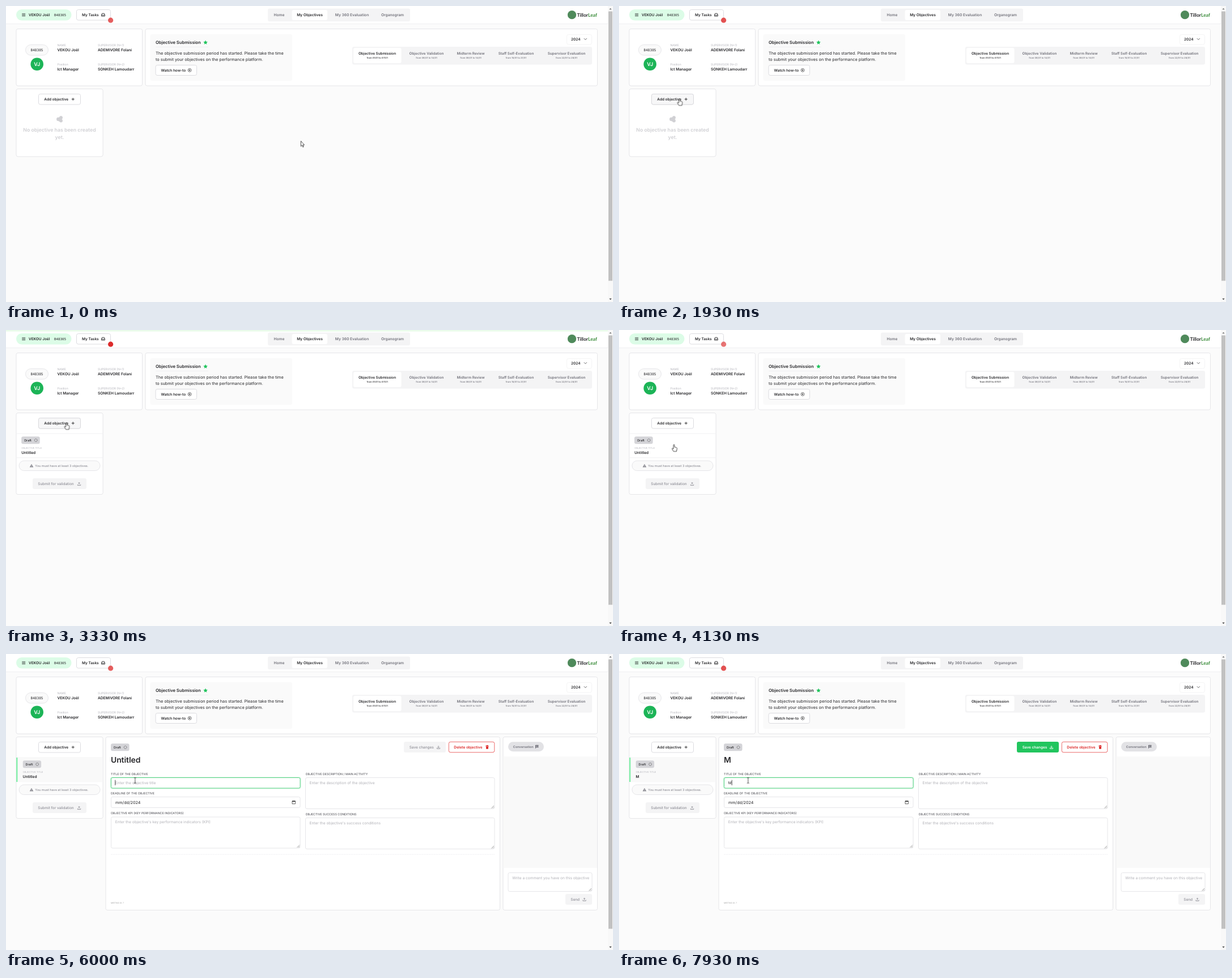
An HTML page that plays this animation: 1071 by 523 pixels, repeating every 8000 ms.

```html
<!DOCTYPE html>
<html lang="en">
<head>
<meta charset="utf-8">
<title>My objectives</title>
<style>
html, body { margin: 0; width: 100%; height: 100%; overflow: hidden; background: #fbfbfb; }
svg { display: block; width: 100vw; height: 100vh; }
text { font: 600 6.45px Inter, sans-serif; fill: #27272a; white-space: pre; text-rendering: geometricPrecision; }
.mid text, .mid { text-anchor: middle; }
.nav text { font-size: 6.6px; }
.name { font-size: 6.6px; }
.stage { font-size: 6.3px; }
.dates { font-size: 4.1px; font-weight: 500; }
.mono { font: 5.8px "DejaVu Sans Mono", monospace; }
.label { font-size: 5.1px; font-weight: 400; fill: #b4b4bb; }
.caps { font-size: 5.25px; font-weight: 400; fill: #3f3f46; }
.hint { font-size: 6.6px; font-weight: 400; fill: #b0b0b6; }
.body { font-size: 7.29px; font-weight: 400; }
.title { font-size: 13.8px; }
.grey { fill: #71717a; }
.off { fill: #8e8e96; font-weight: 500; }
.card, .btn, .box { fill: #fff; stroke: #e0e0e4; stroke-width: .8; }
.btn { stroke: #d4d4d8; }
.soft { fill: #f4f4f5; }
.rule { stroke: #ededef; stroke-width: .8; fill: none; }
.ico { fill: none; stroke: #27272a; stroke-width: .9; }
.ico.dim { stroke: #8e8e96; }

/* one 8 s timeline for everything */
.a { animation: 8s step-end infinite; }
.pulse { fill: #dc2626; animation: pulse 2s cubic-bezier(.4,0,.6,1) -.51s infinite; }
.hover { animation-name: hover; }
.empty { animation-name: empty; }
.list { animation-name: list; }
.open { animation-name: open; }
.row { animation-name: shift; }
.focus { animation-name: focus; }
.caret { animation-name: caret; }
.before { animation-name: before; }
.typed { animation-name: typed; }
.arrow { animation-name: arrow; }
.hand { animation-name: hand; }
.beam { animation-name: beam; }
.bar { fill: #90ee90; animation: bar 8s linear infinite; }
.cursor { animation: move 8s ease-in-out infinite; }

@keyframes pulse { 50% { opacity: .5; } }
@keyframes hover { 0%, 48.625%, 100% { opacity: 0; } 22.375% { opacity: 1; } }
@keyframes empty { 0% { opacity: 1; } 30%, 100% { opacity: 0; } }
@keyframes list { 0% { opacity: 0; } 30%, 100% { opacity: 1; } }
@keyframes open { 0% { opacity: 0; } 56.625%, 100% { opacity: 1; } }
@keyframes shift { 0% { transform: none; } 56.625%, 100% { transform: translateX(2.4px); } }
@keyframes focus { 0% { opacity: 0; } 73.625%, 100% { opacity: 1; } }
@keyframes caret { 0%, 79.875%, 92.375%, 100% { opacity: 0; } 73.625%, 86.125% { opacity: 1; } }
@keyframes before { 0% { opacity: 1; } 96.625%, 100% { opacity: 0; } }
@keyframes typed { 0% { opacity: 0; } 96.625%, 100% { opacity: 1; } }
@keyframes arrow { 0%, 48.625%, 70.125% { opacity: 1; } 22.375%, 49.5%, 70.625%, 100% { opacity: 0; } }
@keyframes hand { 0%, 48.625%, 70.125%, 100% { opacity: 0; } 22.375%, 49.5% { opacity: 1; } }
@keyframes beam { 0% { opacity: 0; } 70.625%, 100% { opacity: 1; } }
@keyframes bar {
  0%, 26.6% { width: 0; opacity: 1; }
  29.1% { width: 85px; }
  32.5% { width: 182px; }
  34.1% { width: 211px; }
  36.5% { width: 290px; }
  39.4% { width: 1062px; opacity: 1; }
  41.6% { width: 1062px; opacity: .2; }
  43.5%, 100% { width: 1062px; opacity: 0; }
}
@keyframes move {
  0%, .9% { transform: translate(520px, 238.5px); animation-timing-function: ease-in; }
  10.875% { transform: translate(255.5px, 191px); animation-timing-function: ease-out; }
  20.5%, 21.6% { transform: translate(95px, 177px); }
  23%, 46.25% { transform: translate(106.5px, 163.5px); }
  53.1%, 66.9% { transform: translate(96px, 206.3px); }
  72.9%, 100% { transform: translate(227.7px, 223.2px); }
}
</style>
</head>
<body>
<svg viewBox="0 0 1071 523" preserveAspectRatio="none">
<defs>
  <g id="draft">
    <rect width="32.5" height="13" rx="3" fill="#d4d4d8"/>
    <text x="5" y="8.5" style="font-size:5.4px;font-weight:500">Draft</text>
    <circle cx="25.5" cy="6.6" r="2.4" class="ico" style="stroke-width:.7;stroke-dasharray:1.2 .7"/>
  </g>
  <path id="grip" d="M-1-5.500L-5.500-1M-1-3L-3-1" fill="none" stroke="#777" stroke-width=".7"/>
  <path id="upload" d="M-2.600 .8V2.500H2.600V.8M0 1V-2.600M-1.500-1.200L0-2.700 1.500-1.200"/>
  <path id="save" d="M-2.600 .8V2.500H2.600V.8M0-2.700V1M-1.500-.4L0 1.100 1.500-.4"/>
</defs>

<rect width="1071" height="523" fill="#fbfbfb"/>

<!-- header -->
<rect width="1062" height="31" fill="#fff"/>
<path class="rule" d="M0 31.500H1062"/>
<rect x="18" y="6" width="97.500" height="19.500" rx="9.750" fill="#dcfce7"/>
<path class="ico" d="M28.200 13.700h6M28.200 15.700h6M28.200 17.700h6" style="stroke-width:.8"/>
<text x="40" y="18">VEKOU Joël</text>
<text x="85" y="17.800" class="mono">B48305</text>
<rect class="btn" x="124.500" y="6.500" width="60" height="18.500" rx="3"/>
<text x="134" y="18">My Tasks</text>
<path class="ico" d="M168.500 15.800L169.500 13.200H173.300L174.300 15.800V18H168.500ZM168.500 15.800H170.200L170.800 16.700H172L172.600 15.800H174.300"/>
<circle class="pulse" cx="184.600" cy="25.200" r="4.600"/>
<rect class="soft" x="462" y="4.500" width="251" height="22.800" rx="3"/>
<rect x="504.500" y="7" width="62.500" height="18" rx="3" fill="#fff"/>
<g class="nav mid">
  <text x="482" y="18" class="grey">Home</text>
  <text x="536" y="18">My Objectives</text>
  <text x="610.500" y="18" class="grey">My 360 Evaluation</text>
  <text x="682" y="18" class="grey">Organogram</text>
</g>
<circle cx="998.500" cy="15.700" r="7.600" fill="#4f8a5b"/>
<text x="1007.500" y="19" style="font:700 8.500px Lato,sans-serif">Tillor<tspan fill="#3f8f3f">Leaf</tspan></text>

<!-- profile -->
<rect class="card" x="18" y="40.500" width="222.500" height="100.500" rx="3"/>
<rect x="34.500" y="68.500" width="40" height="18.500" rx="9.250" fill="#fafafa" stroke="#e0e0e4" stroke-width=".8"/>
<text x="54.500" y="80" class="mono mid" style="font-size:6.100px">B48305</text>
<circle cx="54.700" cy="102.700" r="11.300" fill="#1cb457"/>
<text x="54.700" y="106" class="mid" style="font-size:9px;fill:#fff">VJ</text>
<text x="90.500" y="71.300" class="label">NAME</text>
<text x="90.500" y="80.300" class="name">VEKOU Joël</text>
<text x="162" y="71.300" class="label">SUPERVISOR (N+1)</text>
<text x="162" y="80.300" class="name">ADEMIVORE Folani</text>
<text x="90.500" y="105" class="label">Position</text>
<text x="90.500" y="114" class="name">Ict Manager</text>
<text x="162" y="105" class="label">SUPERVISOR (N+2)</text>
<text x="162" y="114" class="name">SONKEH Lamoudarr</text>

<!-- period -->
<rect class="card" x="246" y="40.500" width="797.500" height="100.500" rx="3"/>
<rect x="254.500" y="50" width="250.500" height="82" rx="3" fill="#fafafa"/>
<text x="264" y="67" style="font-size:7.600px">Objective Submission</text>
<path d="M352 60.600l1.150 2.400 2.600.35-1.900 1.800.5 2.600-2.350-1.250-2.350 1.250.5-2.600-1.900-1.800 2.600-.35z" fill="#22c55e"/>
<path class="rule" d="M264 72.500H357"/>
<text x="264" y="85.600" class="body">The objective submission period has started. Please take the time</text>
<text x="264" y="96.600" class="body">to submit your objectives on the performance platform.</text>
<rect class="btn" x="264" y="104.500" width="72.500" height="18" rx="3"/>
<text x="273.500" y="115.600">Watch how-to</text>
<circle class="ico" cx="324" cy="113.400" r="2.900" style="stroke-width:.7"/>
<path d="M323.100 112l2.300 1.400-2.300 1.400z"/>
<rect x="989.500" y="50.500" width="44" height="17.500" rx="3" fill="#fff" stroke="#f4f4f5"/>
<text x="997" y="61">2024</text>
<path class="ico" d="M1019.800 57.200l2.500 2.500 2.500-2.500" style="stroke-width:.7"/>
<rect class="soft" x="611" y="72" width="423" height="31.500" rx="3"/>
<rect x="613" y="74" width="84.500" height="27" rx="3" fill="#fff"/>
<g class="mid">
  <text x="655" y="85.500" class="stage">Objective Submission</text>
  <text x="655" y="93.200" class="dates">from 01/01 to 07/01</text>
  <text x="742" y="85.500" class="stage grey">Objective Validation</text>
  <text x="742" y="93.200" class="dates grey">from 08/01 to 14/01</text>
  <text x="820" y="85.500" class="stage grey">Midterm Review</text>
  <text x="820" y="93.200" class="dates grey">from 08/01 to 14/01</text>
  <text x="900" y="85.500" class="stage grey">Staff Self-Evaluation</text>
  <text x="900" y="93.200" class="dates grey">from 15/01 to 21/01</text>
  <text x="989" y="85.500" class="stage grey">Supervisor Evaluation</text>
  <text x="989" y="93.200" class="dates grey">from 22/01 to 28/01</text>
</g>

<!-- no objectives -->
<g class="a empty mid">
  <rect class="card" x="18" y="146.500" width="153" height="119.500" rx="3"/>
  <g fill="#d0d0d4"><circle cx="92.300" cy="200" r="3.200"/><circle cx="97" cy="197.200" r="2.900"/><circle cx="97" cy="202.700" r="2.900"/><path d="M92 197.500l5-2.500v10l-5-2z"/></g>
  <text x="94.500" y="221.700" style="font-size:8.750px;fill:#d0d0d4">No objective has been created</text>
  <text x="94.500" y="234.700" style="font-size:8.750px;fill:#d0d0d4">yet.</text>
</g>

<!-- objective list -->
<g class="a list">
  <rect class="card" x="18" y="146.500" width="153" height="144" rx="3"/>
  <path class="rule" d="M18.500 183H170.500M18.500 225.700H170.500"/>
  <g class="a open">
    <rect x="18.500" y="183" width="152" height="43" fill="#f9f9f9"/>
    <rect x="18" y="183" width="2.500" height="43" fill="#86efac"/>
  </g>
  <g class="a row">
    <use href="#draft" x="27.200" y="188.200"/>
    <text x="27.200" y="210" class="label" style="font-size:4.200px">OBJECTIVE TITLE</text>
    <text x="27.200" y="219" class="name a before">Untitled</text>
    <text x="27.200" y="219" class="name a typed">M</text>
  </g>
  <rect x="23" y="231" width="143" height="17.500" rx="8.750" fill="#fafafa" stroke="#e0e0e4" stroke-width=".8"/>
  <path d="M45 236.800l3.300 5.800h-6.600z" fill="#85858d"/>
  <path d="M45 238.700v2M45 241.300v.7" stroke="#fff" stroke-width=".7"/>
  <text x="51.300" y="241.800" class="off" style="font-size:5.500px">You must have at least 3 objectives.</text>
  <rect class="soft" x="47" y="262" width="95" height="19" rx="3"/>
  <text x="56.300" y="274" class="off">Submit for validation</text>
  <use href="#upload" x="129" y="272" class="ico dim"/>
</g>
<rect class="btn" x="57.500" y="155.500" width="74" height="18.500" rx="3"/>
<rect class="btn a hover" x="57.500" y="155.500" width="74" height="18.500" rx="3" style="fill:#f7f7f8"/>
<text x="67.300" y="167">Add objective</text>
<path class="ico" d="M115.700 164.700h5M118.200 162.200v5"/>

<!-- objective form -->
<g class="a open">
  <rect class="card" x="176" y="146.500" width="695.500" height="306" rx="3"/>
  <use href="#draft" x="185" y="158.300"/>
  <g class="a before">
    <text x="185" y="192.200" class="title">Untitled</text>
    <rect class="soft" x="702" y="155" width="74" height="19" rx="3"/>
    <text x="711.700" y="167" class="off">Save changes</text>
    <use href="#save" x="763" y="164.800" class="ico dim"/>
  </g>
  <g class="a typed">
    <text x="185" y="192.200" class="title">M</text>
    <rect x="702" y="155" width="74" height="19" rx="3" fill="#22c55e"/>
    <text x="711.700" y="167" style="fill:#fff">Save changes</text>
    <use href="#save" x="763" y="164.800" class="ico" style="stroke:#fff"/>
  </g>
  <rect x="781.300" y="155.300" width="80.500" height="18.500" rx="3" fill="#fff" stroke="#e64545" stroke-width=".8"/>
  <text x="790.300" y="167" style="fill:#dc2626">Delete objective</text>
  <path d="M846.300 162h5.400v1h-5.400zM848 161h2v1h-2zM846.800 163.500h4.400l-.4 4.200h-3.600z" fill="#dc2626"/>

  <text x="185" y="213.800" class="caps">TITLE OF THE OBJECTIVE</text>
  <rect class="box" x="185.500" y="218.500" width="333.500" height="18.500" rx="2.500"/>
  <g class="a focus">
    <rect x="184.800" y="217.800" width="334.900" height="19.900" rx="3.200" fill="none" stroke="#d3f8df" stroke-width="1.800"/>
    <rect x="185.500" y="218.500" width="333.500" height="18.500" rx="2.500" fill="#fff" stroke="#3cc470" stroke-width=".8"/>
  </g>
  <text x="192.800" y="230" class="hint a before">Enter the objective title</text>
  <g class="a typed">
    <text x="192.800" y="230" class="hint" style="fill:#27272a">M</text>
    <path d="M199.200 222.500v9.500" stroke="#222" stroke-width=".8"/>
  </g>
  <path class="a caret" d="M192.700 222.500v9.500" stroke="#222" stroke-width=".8"/>

  <text x="185" y="247.800" class="caps">DEADLINE OF THE OBJECTIVE</text>
  <rect class="box" x="185.500" y="252.500" width="333.500" height="19" rx="2.500"/>
  <text x="193" y="264.700" style="font-size:7.200px;font-weight:400">mm/dd/2024</text>
  <path d="M505 259.800h5.400v5h-5.400z" fill="none" stroke="#222" stroke-width=".7"/>
  <path d="M505 260.200h5.400" stroke="#222" stroke-width="1.300"/>

  <text x="185" y="283" class="caps">OBJECTIVE KPI (KEY PERFORMANCE INDICATORS)</text>
  <rect class="box" x="185.500" y="288" width="333.500" height="55" rx="2.500"/>
  <text x="192.800" y="299" class="hint">Enter the objective's key performance indicators (KPI)</text>
  <use href="#grip" x="519" y="343"/>

  <text x="528.500" y="213.800" class="caps">OBJECTIVE DESCRIPTION / MAIN ACTIVITY</text>
  <rect class="box" x="528.500" y="218.500" width="333.500" height="55" rx="2.500"/>
  <text x="535.500" y="230" class="hint">Enter the description of the objective</text>
  <use href="#grip" x="862" y="273.500"/>

  <text x="528.500" y="284.600" class="caps">OBJECTIVE SUCCESS CONDITIONS</text>
  <rect class="box" x="528.500" y="289.500" width="333.500" height="55" rx="2.500"/>
  <text x="535.500" y="301" class="hint">Enter the objective's success conditions</text>
  <use href="#grip" x="862" y="344.500"/>
  <path class="rule" d="M185 354.200H862" stroke-dasharray="2 1"/>
  <text x="185" y="441.300" class="label" style="font-size:3.300px;fill:#999">MEETING ID: 7</text>

  <!-- conversation -->
  <rect class="card" x="877" y="146.500" width="166.500" height="306" rx="3"/>
  <rect x="886" y="155.300" width="63" height="17" rx="8.500" fill="#e2e2e5"/>
  <text x="894.800" y="165.700" class="grey" style="font-size:5.550px">Conversation</text>
  <path d="M934.500 161v5.800M934.500 161.300h4.800l-1 1.700 1 1.700h-4.800" fill="#a1a1aa" stroke="#52525b" stroke-width=".8"/>
  <rect x="877.500" y="181" width="165.500" height="197" fill="#f9f9f9"/>
  <rect class="box" x="886" y="386.500" width="148" height="33" rx="2.500"/>
  <text x="893.200" y="398" class="hint">Write a comment you have on this objective</text>
  <use href="#grip" x="1034" y="419.500"/>
  <rect class="soft" x="987" y="424" width="47" height="19" rx="3"/>
  <text x="996.300" y="436" class="off">Send</text>
  <use href="#upload" x="1020.500" y="433.700" class="ico dim"/>
</g>

<rect class="bar" height="2.600" width="0"/>

<!-- scrollbar -->
<rect x="1062" width="9" height="523" fill="#f8f8f8"/>
<rect x="1063" y="9.500" width="7" height="476" fill="#c1c1c1"/>
<path d="M1064.300 6.300l2.200-2.500 2.200 2.500z" fill="#777"/>
<path d="M1064.300 516.700l2.200 2.500 2.200-2.500z" fill="#444"/>

<g class="cursor">
  <path class="a arrow" d="M.3 0V9.400L2.400 7.500 3.900 10.800 5.200 10.200 3.800 7H6.500Z" fill="#fff" stroke="#111" stroke-width=".75"/>
  <path class="a hand" d="M-1 1.200C-1-.2 1-.2 1 1.200V4.600L4.600 5.500C5.400 5.700 5.600 6.300 5.400 7.200L4.500 12.200H-.8L-3.400 7.900C-3.900 7-2.800 6.200-2 7L-1 8Z" fill="#fff" stroke="#111" stroke-width=".75"/>
  <path class="a beam" d="M-2-4.700H-.5L0-4.200 .5-4.700H2M0-4.200V4.500M-2 5H-.5L0 4.500 .5 5H2" fill="none" stroke="#222" stroke-width=".8"/>
</g>
</svg>
</body>
</html>
```
